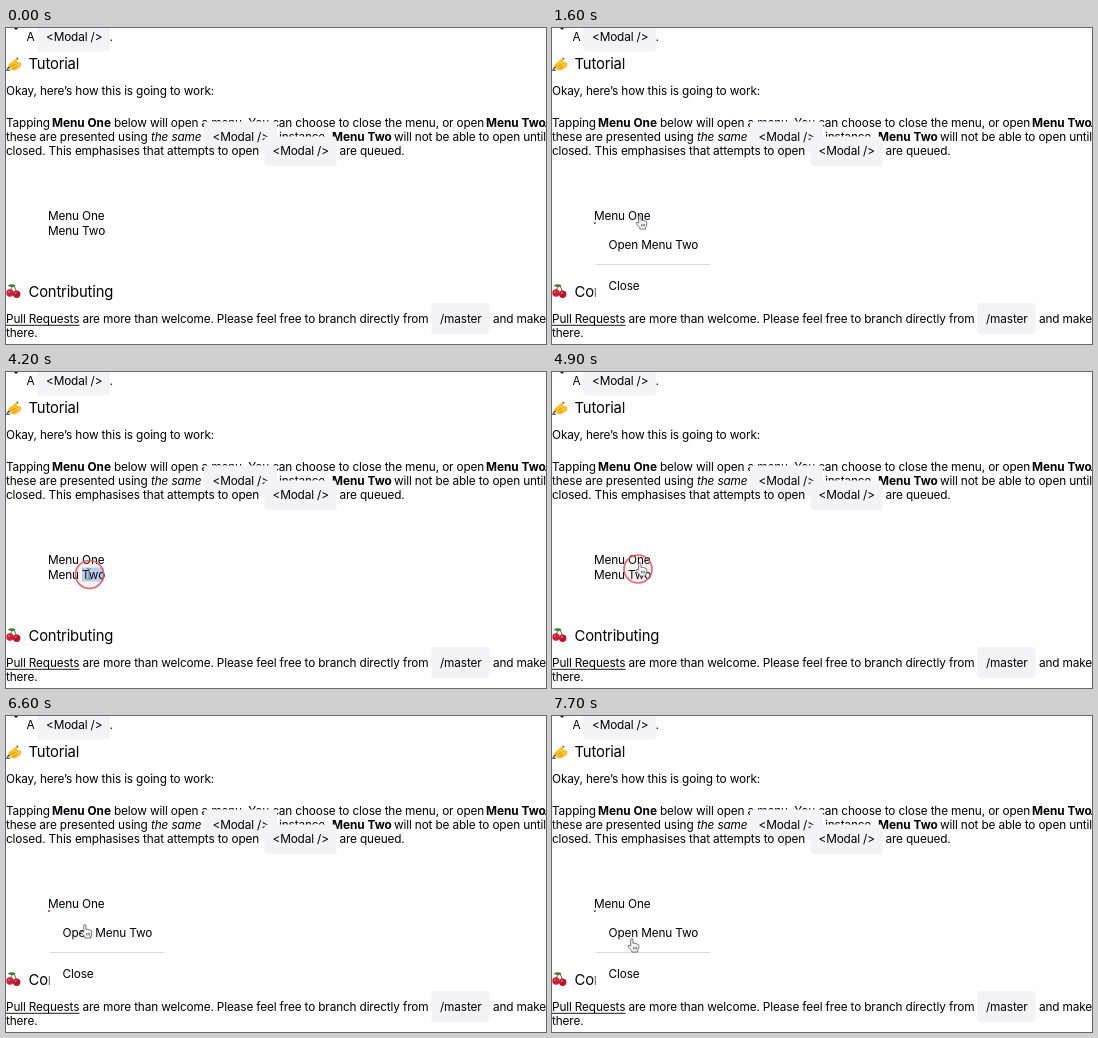
An HTML page for the animation above (8000 ms loop, 540x316 px).

```html
<!DOCTYPE html>
<html lang="en">
<head>
<meta charset="utf-8">
<title>Modal tutorial</title>
<style>
html, body { margin: 0; width: 100%; height: 100%; overflow: hidden; background: #fefdff; }
svg { display: block; width: 540px; height: 316px; }
text { font: 11.8px Inter, Roboto, sans-serif; letter-spacing: -.14px; fill: #000; }
.b { font-weight: 700; letter-spacing: 0; }
.i { font-style: italic; }
.h { font-size: 14.8px; letter-spacing: -.16px; }
.pill { fill: #f3f2f4; }
.paper { fill: #fefdff; }
</style>
</head>
<body>
<svg viewBox="0 0 540 316">
  <circle cx="10" cy="0" r="1.6"/>
  <text x="20.5" y="13">A</text>
  <rect class="pill" x="31" y="-6" width="73" height="29.5" rx="3"/>
  <text x="40" y="13">&lt;Modal /&gt;</text>
  <text x="103.5" y="13">.</text>

  <g id="writing">
    <path d="M1 41.5 12 30" stroke="#45434a" stroke-width="1.4"/>
    <path d="M2.5 36.5 8 32Q10.500 29.500 11.500 31L10.500 33.500 14.500 34.500Q16.500 36 14.500 39L10 42Q6 43 3.500 41L5.500 38.500 2 39Z" fill="#fbc12c"/>
    <path d="M5.500 38.500 9.500 36.500M7 41 11 38.500" stroke="#d08a1a" stroke-width=".8"/>
    <path d="M0 42.300H4" stroke="#45434a"/>
  </g>
  <text class="h" x="22.500" y="41">Tutorial</text>
  <text x="0" y="67.300">Okay, here’s how this is going to work:</text>

  <text x="0" y="98.800">Tapping</text>
  <text class="b" x="46" y="98.800">Menu One</text>
  <text x="108" y="98.800">below will open a menu. You can choose to close the menu, or open</text>
  <text class="b" x="480" y="98.800">Menu Two</text>
  <text x="538" y="98.800">.</text>

  <text x="0" y="113">these are presented using</text>
  <text class="i" x="145" y="113">the same</text>
  <rect class="pill" x="198" y="93.500" width="73" height="30" rx="3"/>
  <text x="206.500" y="113">&lt;Modal /&gt;</text>
  <text x="273" y="113">instance.</text>
  <text class="b" x="326" y="113">Menu Two</text>
  <text x="388" y="113">will not be able to open until</text>

  <text x="0" y="127.400">closed. This emphasises that attempts to open</text>
  <rect class="pill" x="258.500" y="108.500" width="72" height="29.500" rx="3"/>
  <text x="266.500" y="127.400">&lt;Modal /&gt;</text>
  <text x="333.500" y="127.400">are queued.</text>

  <rect id="selection" x="76" y="195.500" width="22" height="14" fill="#b4d5fa"/>
  <text x="42" y="192.400">Menu One</text>
  <text id="second" x="42" y="206.800">Menu Two</text>

  <g id="cherries">
    <path d="M4 263Q5 259 8 257.500Q9.500 261 10.500 264" fill="none" stroke="#56702b"/>
    <path d="M1.500 257.500Q6 255 9.500 257.500Q7 261 1.500 257.500Z" fill="#467d2d"/>
    <circle cx="4" cy="265" r="3.700" fill="#cf1f35"/>
    <circle cx="10.700" cy="266.300" r="3.700" fill="#b8162c"/>
    <circle cx="3" cy="263.800" r=".9" fill="#f0747e"/>
    <circle cx="9.800" cy="265" r=".9" fill="#f0747e"/>
  </g>
  <text class="h" x="22.500" y="269">Contributing</text>

  <text x="0" y="295.300">Pull Requests</text>
  <path d="M0 297.300H73.500" stroke="#000" stroke-width=".9"/>
  <text x="76.500" y="295.300">are more than welcome. Please feel free to branch directly from</text>
  <rect class="pill" x="425.500" y="275" width="58" height="31" rx="3"/>
  <text x="434" y="295.300">/master</text>
  <text x="487" y="295.300">and make</text>
  <text x="0" y="309.400">there.</text>

  <g id="menu">
    <rect class="paper" x="43.500" y="195" width="115.500" height="79"/>
    <rect x="42" y="194" width="1.800" height="2" fill="#e0454f"/>
    <text x="56.500" y="221">Open Menu Two</text>
    <path d="M43.500 236.500H158.500" stroke="#dbdadc"/>
    <text x="56.500" y="262.400">Close</text>
  </g>

  <circle id="ring" fill="#e0606a" fill-opacity=".08" stroke="#dc5a62" stroke-width="1.700"/>
  <g id="cursor">
    <path id="hand" transform="scale(.87)" d="M-1.500 8V1Q-1.500-.5-.2-.5T1.100 1V5Q2.500 4 3.500 5.400Q4.900 4.600 5.700 6Q7.700 5.500 7.800 7.500V10Q7.800 12 6.500 13V15H-.2V13.500L-4.300 9Q-5 7.300-3.500 7.200T-1.500 8.500M1.800 9V12M3.600 9V12M5.300 9V12" fill="#f6f5f7" stroke="#55545a" stroke-width=".9" stroke-linejoin="round"/>
    <path id="beam" d="M-2-5.500Q0-5.500 0-4Q0-5.500 2-5.500M0-4V4M-2 5.500Q0 5.500 0 4Q0 5.500 2 5.500" fill="none" stroke="#66656b" stroke-width=".8"/>
  </g>
</svg>
<script>
const LOOP = 8000, STEP = 100;
// Pointer hotspot: time, x, y
const path = [
  [1000, 40, 236], [1300, 88, 188], [2200, 88, 188], [2600, 74, 260],
  [3400, 74, 260], [3800, 83, 202], [4700, 83, 202], [4900, 88, 191],
  [5300, 88, 191], [5600, 79, 190], [5800, 89, 189], [6200, 88, 189],
  [6600, 79, 209], [7100, 79, 210], [7700, 80, 223]
];
const clicks = [1300, 2600, 3800, 4100, 4800, 5800];
const $ = id => document.getElementById(id);
const within = (t, a, b) => t >= a && t < b;
const show = (id, on) => $(id).setAttribute('visibility', on ? 'visible' : 'hidden');

function pointer(t) {
  const i = path.findIndex(p => p[0] > t);
  if (i < 0) return path[path.length - 1].slice(1);
  if (i === 0) return path[0].slice(1);
  const [a, x, y] = path[i - 1], [b, u, v] = path[i];
  const k = (t - a) / (b - a), e = k * k * (3 - 2 * k);
  return [x + (u - x) * e, y + (v - y) * e];
}

function draw(now) {
  const t = Math.floor(now % LOOP / STEP) * STEP;
  const [x, y] = pointer(t);
  const typing = within(t, 3800, 4800);
  const open = within(t, 1500, 2800) || t >= 6200;
  show('hand', t >= 1000 && !typing);
  show('beam', typing);
  $('cursor').setAttribute('transform', `translate(${x} ${y})`);
  show('menu', open);
  show('second', !open);
  show('selection', within(t, 4200, 4800));

  const click = clicks.find(c => within(t, c + 100, c + 300));
  show('ring', click !== undefined);
  if (click !== undefined) {
    const age = (t - click) / 100, [cx, cy] = pointer(click);
    const ring = $('ring');
    ring.setAttribute('cx', cx + .5);
    ring.setAttribute('cy', cy + .5);
    ring.setAttribute('r', 14 * age);
    ring.setAttribute('opacity', 1.5 - .6 * age);
  }
  requestAnimationFrame(() => draw(performance.now()));
}
draw(performance.now());
</script>
</body>
</html>
```
